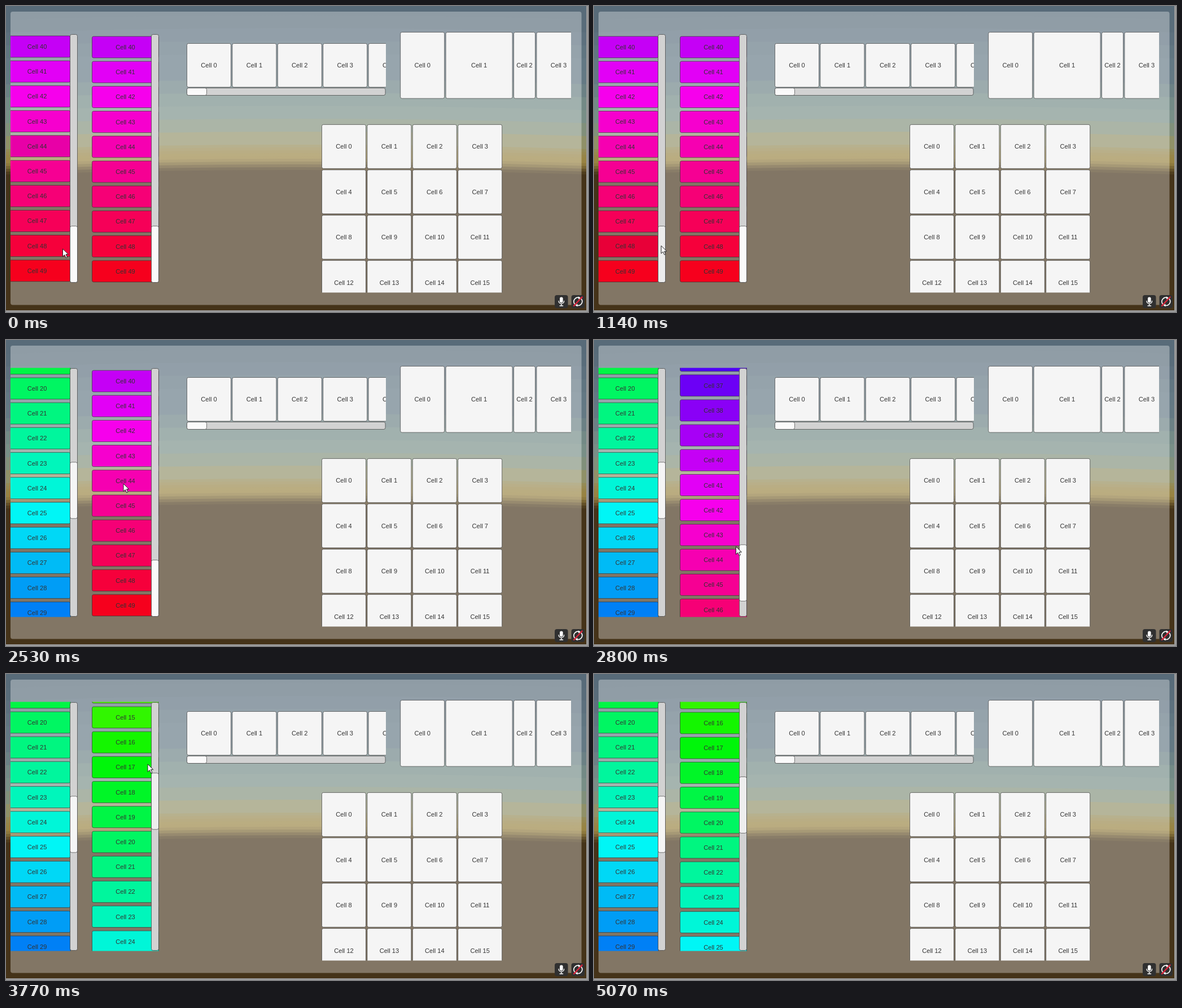
Animation, 1031 px wide and 543 px high, one loop 5170 ms. Source, as an HTML page:

```html
<!DOCTYPE html>
<html lang="en">
<head>
<meta charset="utf-8">
<title>Scroll views</title>
<style>
  html, body { margin: 0; width: 100%; height: 100%; overflow: hidden; background: #45331a; }
  svg { display: block; width: 1031px; height: 543px; }
  text { font: 11.1px "Liberation Sans", Arial, sans-serif; fill: #323232; text-anchor: middle; }
  .edge { stroke: #282828; stroke-opacity: .6; stroke-width: 1; }
</style>
</head>
<body>
<svg viewBox="0 0 1031 543">
  <defs>
    <clipPath id="clipA"><rect x="8" y="49.5" width="107" height="442"/></clipPath>
    <clipPath id="clipB"><rect x="151.5" y="49.5" width="119.5" height="442"/></clipPath>
    <clipPath id="clipRow"><rect x="319" y="60" width="354" height="90"/></clipPath>
    <clipPath id="clipWide"><rect x="697" y="40" width="304" height="130"/></clipPath>
    <clipPath id="clipGrid"><rect x="558" y="209" width="322" height="299.5"/></clipPath>
  </defs>
  <g id="sky"></g>
  <rect x="8" y="10" width="1011.5" height="520.5" rx="4" fill="#fff" fill-opacity=".33"/>
  <path d="M1028 0H1031V543H0V540H1028Z" fill="#999"/>
  <g id="listA" clip-path="url(#clipA)"></g>
  <g id="listB" clip-path="url(#clipB)"></g>
  <g id="bars"></g>
  <g id="row" clip-path="url(#clipRow)"></g>
  <g id="wide" clip-path="url(#clipWide)"></g>
  <g id="grid" clip-path="url(#clipGrid)"></g>
  <g fill="none" stroke-linecap="round">
    <rect x="972" y="513" width="23.5" height="23" rx="4" fill="#303030"/>
    <rect x="981" y="516.5" width="5.6" height="10" rx="2.8" fill="#fff"/>
    <path d="M979 523.5a4.8 4.8 0 0 0 9.6 0M983.8 528.5v3.2M981 532h5.6" stroke="#fff" stroke-width="1.3"/>
    <rect x="1001.5" y="513" width="23.5" height="23" rx="4" fill="#303030"/>
    <path d="M1007.2 528.5a7.2 7.2 0 0 1 8.5-10.8M1019.3 520a7.2 7.2 0 0 1-8.5 10.9" stroke="#fff" stroke-width="1.6"/>
    <path d="M1014 515.4l4 2.6-4 2.6zM1012.4 528.4l-4 2.6 4 2.6z" fill="#fff"/>
    <path d="M1006 532L1020.5 516.5" stroke="#e0243c" stroke-width="2.3"/>
  </g>
  <path id="cursor" d="M.5.5V14.2L3.8 11.1 6.2 16.4 8.4 15.4 6.1 10.2H10.4Z" fill="#fff" stroke="#222"/>
</svg>
<script>
const LOOP = 5170;
const PITCH = 44.2;         // distance between list cells
const GAP = 80.4;           // distance between square cells
const RATIO = 5.165;        // content travel per pixel of handle travel
const $ = id => document.getElementById(id);

// Key points: [position, values...]
const SKY = [[0, 88, 107, 121], [100, 99, 120, 132], [185, 120, 143, 135],
  [235, 145, 145, 102], [270, 152, 131, 66], [297, 69, 51, 25]];
const PATH = [[540, 100, 430.5], [1120, 118.5, 425], [1680, 119.5, 262.5], [2100, 240, 250],
  [2530, 207.5, 254.5], [2930, 268, 410], [3210, 266, 313], [3770, 250.5, 159.5],
  [3910, 251, 165], [4330, 868, 478]];

// Smooth progress from 0 to 1 between two times
function ease(t, from, to) {
  const f = Math.min(1, Math.max(0, (t - from) / (to - from)));
  return f * f * (3 - 2 * f);
}

function along(keys, t) {
  let [, ...values] = keys[0];
  for (let n = 1; n < keys.length; n++) {
    const f = ease(t, keys[n - 1][0], keys[n][0]);
    values = values.map((v, i) => v + (keys[n][i + 1] - v) * f);
  }
  return values;
}

function add(parent, tag, attrs, label) {
  const el = document.createElementNS("http://www.w3.org/2000/svg", tag);
  for (const k in attrs) el.setAttribute(k, attrs[k]);
  if (label) el.textContent = label;
  return parent.appendChild(el);
}

function box(parent, x, y, width, height, fill, rx = 2.8) {
  return add(parent, "rect", { x, y, width, height, rx, fill, class: "edge" });
}

function cell(parent, x, y, w, h, i, fill = "#f5f5f5") {
  const rect = box(parent, x, y, w, h, fill);
  add(parent, "text", { x: x + w / 2, y: y + h / 2 + 4 }, "Cell " + i);
  return rect;
}

const hue = (i, light = 48.2) => `hsl(${i * 7.2} 100% ${light}%)`;
const rgb = values => `rgb(${values.map(Math.round)})`;

// Arched bands, finer towards the horizon
function buildSky() {
  for (let y = -30; y < 300; y += y < 235 ? 23 : 5) {
    add($("sky"), "path", {
      d: `M0 ${y + 8}Q515 ${y - 8} 1031 ${y + 8}V543H0Z`,
      fill: rgb(along(SKY, y + 5))
    });
  }
}

function buildList(view, x) {
  const group = add(view, "g", {});
  const cells = [];
  for (let i = 0; i < 50; i++)
    cells.push(cell(group, x, 54 + (i - 40) * PITCH, 118, 38, i, hue(i)));
  return { group, cells };
}

function buildBar(x) {
  box($("bars"), x, 50.5, 13, 440, "#d2d2d2", 3);
  return box($("bars"), x, 390.5, 13, 100, "#fafafa", 3);
}

buildSky();
const listA = buildList($("listA"), -3.9);
const listB = buildList($("listB"), 152.5);
const barA = buildBar(113.5), barB = buildBar(257.5);

for (let i = 0; i < 5; i++) cell($("row"), 320.5 + i * GAP, 66.5, 78, 77.5, i);
box($("bars"), 320.5, 145.5, 351.5, 13, "#d2d2d2", 3);
box($("bars"), 320.5, 145.5, 35, 13, "#fafafa", 3);

let left = 698.7;
[78, 118, 38, 78].forEach((w, i) => {
  cell($("wide"), left, 46.5, w, 117.5, i);
  left += w + 2.4;
});

for (let i = 0; i < 16; i++)
  cell($("grid"), 559.5 + i % 4 * GAP, 210.4 + (i >> 2) * GAP, 78, 78, i);

function setScroll(list, bar, shift, shade) {
  list.group.setAttribute("transform", `translate(0 ${shift.toFixed(2)})`);
  bar.setAttribute("y", 390.5 - Math.max(0, shift) / RATIO);
  bar.setAttribute("fill", rgb([shade, shade, shade]));
}

// Overscroll settles, handle drag, then snap to a cell
const scrollA = t => -Math.exp(-t / 500)
  + 809 * ease(t, 1120, 1680) + 88 * ease(t, 1680, 2050);

// Flick, handle drag, then a slow snap to a cell
const scrollB = t => 489 * ease(t, 2560, 3210) + 620 * ease(t, 3300, 3770)
  - 35 * (1 - Math.exp(-Math.max(0, t - 3770) / 330));

// Handles darken on hover and press, and lighten on release
const shadeA = t => 250 - 14 * ease(t, 840, 1120) - 46 * ease(t, 1120, 1400) + 55 * ease(t, 1810, 2170);
const shadeB = t => 250 - 58 * ease(t, 3210, 3490) + 46 * ease(t, 3630, 3770);

// The picture refreshes every 140 ms, or 120 ms in the middle stretch
function hold(t) {
  const base = t < 1690 ? 0 : t < 2650 ? 1690 : 2650;
  const step = base === 1690 ? 120 : 140;
  return base + Math.floor((t - base) / step) * step;
}

function draw(time) {
  const t = hold(time);
  setScroll(listA, barA, scrollA(t), shadeA(t));
  setScroll(listB, barB, scrollB(t), shadeB(t));
  const selected = t < 600 ? 44 : 48;
  for (const i of [44, 48])
    listA.cells[i].setAttribute("fill", hue(i, i === selected ? 45.5 : 48.2));
  const [x, y] = along(PATH, t);
  $("cursor").setAttribute("transform", `translate(${x} ${y})`);
  $("cursor").setAttribute("visibility", t < 4470 ? "visible" : "hidden");
}

const start = performance.now();
function loop() {
  draw((performance.now() - start) % LOOP);
  requestAnimationFrame(loop);
}
loop();
</script>
</body>
</html>
```
